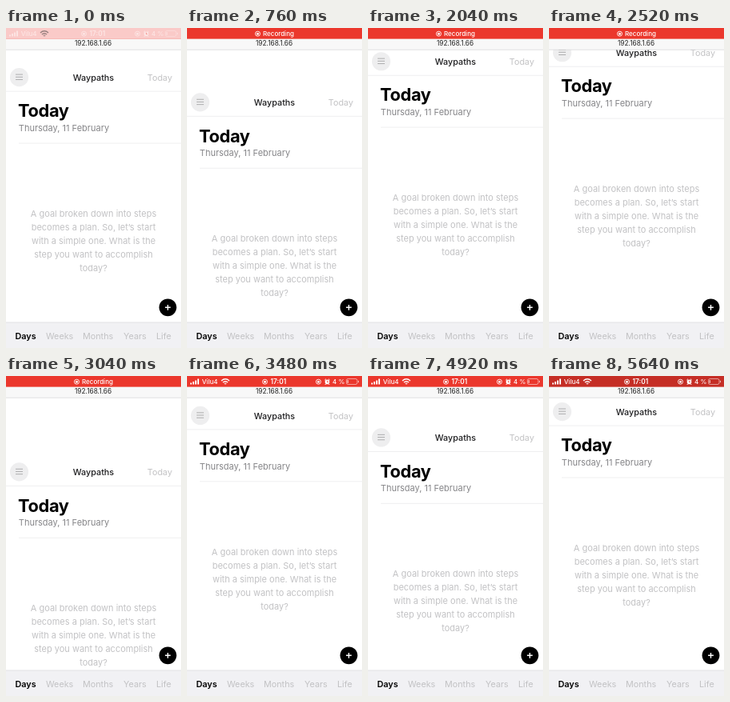
An HTML page for the animation above (5.68 s loop, 219 by 400 pixels).

```html
<!DOCTYPE html>
<html lang="en">
<head>
<meta charset="utf-8">
<title>Day planner</title>
<style>
  html, body { margin: 0; width: 100%; height: 100%; overflow: hidden; background: #fff; }
  svg { display: block; width: 219px; height: 400px; font: 10.8px Inter, "Open Sans", sans-serif; }
  .mid { text-anchor: middle; }
  .end { text-anchor: end; }
  .pale { fill: #c2c2c4; }
  .body { font-size: 11px; }
  .small { font-size: 8px; font-weight: 500; fill: #fff; }
  .line { stroke: #efeff0; }
</style>
</head>
<body>
<svg viewBox="0 0 219 400">
  <defs>
    <g id="rec" fill="none" stroke="#fff" stroke-width=".9">
      <circle r="3"/><circle r="1.5" fill="#fff" stroke="none"/>
    </g>
  </defs>
  <rect width="219" height="400" fill="#fff"/>

  <g id="page">
    <circle cx="16.5" cy="44.6" r="11.6" fill="#eeeeef"/>
    <path d="M12 41h9M12 44.2h9M12 47.4h9" stroke="#a6a6a8" stroke-width=".9"/>
    <text class="mid" x="109.5" y="49" font-weight="500" fill="#1c1c1e">Waypaths</text>
    <text class="end pale" x="208" y="49">Today</text>
    <path class="line" d="M0 62.1H219M16 127H219"/>
    <text x="15" y="94.3" font-size="21.8" font-weight="700" letter-spacing="-.35">Today</text>
    <text class="body" x="15.8" y="111.8" fill="#858588">Thursday, 11 February</text>
    <g id="copy" class="mid pale body"></g>
  </g>

  <circle cx="202.5" cy="349.3" r="10.9"/>
  <path d="M199.1 349.3h6.8M202.5 345.9v6.8" stroke="#fff" stroke-width="1.4"/>

  <rect y="368" width="219" height="32" fill="#f1f1f4"/>
  <path d="M0 368H219" stroke="#dcdcdf" stroke-width=".8"/>
  <g class="pale">
    <text x="11.5" y="389" font-weight="600" fill="#000">Days</text>
    <text x="50" y="389">Weeks</text>
    <text x="96" y="389">Months</text>
    <text x="147" y="389">Years</text>
    <text x="188" y="389">Life</text>
  </g>

  <rect y="13" width="219" height="14" fill="#f8f8f8"/>
  <path d="M0 27.2H219" stroke="#d8d8da" stroke-width=".8"/>
  <text class="mid" x="109" y="22.1" font-size="8.3" fill="#222">192.168.1.66</text>

  <rect width="219" height="13.6" fill="#eb372c"/>
  <rect id="veil" width="219" height="13.6" fill="#fff"/>
  <rect id="shade" width="219" height="13.6"/>
  <g id="recording">
    <use href="#rec" x="88.5" y="7.2"/>
    <text class="small" x="95" y="10.2">Recording</text>
  </g>
  <g id="status">
    <path d="M5 10.5v-2M8 10.5v-3.5M11 10.5v-5M14 10.5v-7" stroke="#fff" stroke-width="1.9"/>
    <text class="small" x="18.7" y="10.2">Vilu4</text>
    <g id="wifi" fill="none" stroke="#fff" stroke-width="1.4">
      <path d="M43 6.1Q48 1.6 53 6.1M44.9 8Q48 5.3 51.1 8"/>
      <path d="M46.8 9.2L48 10.4L49.2 9.2Z" stroke-width=".8"/>
    </g>
    <use href="#rec" x="97.5" y="7.2"/>
    <text class="small" x="104.5" y="10.2" style="font-weight:600;font-size:8.3px">17:01</text>
    <use href="#rec" x="164.5" y="7.2"/>
    <circle cx="175.5" cy="7.4" r="2.8" fill="#fff"/>
    <path d="M172.3 5.2L174 3.7M178.7 5.2L177 3.7M173.5 10L172.8 11M177.5 10L178.2 11" stroke="#fff"/>
    <path d="M175.5 5.7V7.6H177" fill="none" stroke="#eb372c" stroke-width=".7"/>
    <text class="small" x="182" y="10.2">4 %</text>
    <rect x="199.5" y="3.5" width="13.5" height="7" rx="2" fill="none" stroke="#fff" stroke-opacity=".65" stroke-width=".8"/>
    <path d="M214.5 5.8v2.4" stroke="#fff" stroke-opacity=".65"/>
    <path d="M201.2 5.1v3.8" stroke="#fff" stroke-width="1"/>
  </g>
</svg>
<script>
  const LOOP = 5680;
  const $ = id => document.getElementById(id);

  const lines = ["A goal broken down into steps", "becomes a plan. So, let’s start",
    "with a simple one. What is the", "step you want to accomplish", "today?"];
  $("copy").innerHTML = lines
    .map((s, i) => `<text x="109.5" y="${219 + i * 17}">${s}</text>`).join("");

  // Each drag swells to its distance at one moment, then springs back.
  const drags = [
    { at: 0, by: 6.7, rise: 400, fall: 400 },
    { at: 1400, by: 72, rise: 1005, fall: 407 },
    { at: 2400, by: -16.5, rise: 456, fall: 456 },
    { at: 3020, by: 78, rise: 250, fall: 277 },
    { at: 4300, by: -3.2, rise: 300, fall: 300 },
    { at: 4680, by: 68, rise: 110, fall: 280 },
  ];
  const pull = (t, { at, by, rise, fall }) =>
    by * Math.exp(-(((t - at) / (t < at ? rise : fall)) ** 2));
  const offset = t => drags.reduce((sum, d) => sum + pull(t, d), 0);

  const ramp = (t, from, to) => Math.min(1, Math.max(0, (t - from) / (to - from)));
  const fade = (id, opacity) => $(id).setAttribute("opacity", opacity);

  function draw(now) {
    const t = now % LOOP;
    const swap = ramp(t, 3180, 3380);
    $("page").setAttribute("transform", `translate(0 ${offset(t).toFixed(2)})`);
    fade("veil", .74 * (1 - ramp(t, 0, 350)));
    fade("shade", .16 * ramp(t, 5400, 5640));
    fade("status", .5 * (1 - ramp(t, 0, 400)) + swap);
    fade("recording", ramp(t, 150, 450) - swap);
    $("wifi").setAttribute("stroke", t < 400 ? "#333" : "#fff");
  }

  const start = performance.now();
  function tick() {
    draw(performance.now() - start);
    requestAnimationFrame(tick);
  }
  tick();
</script>
</body>
</html>
```
